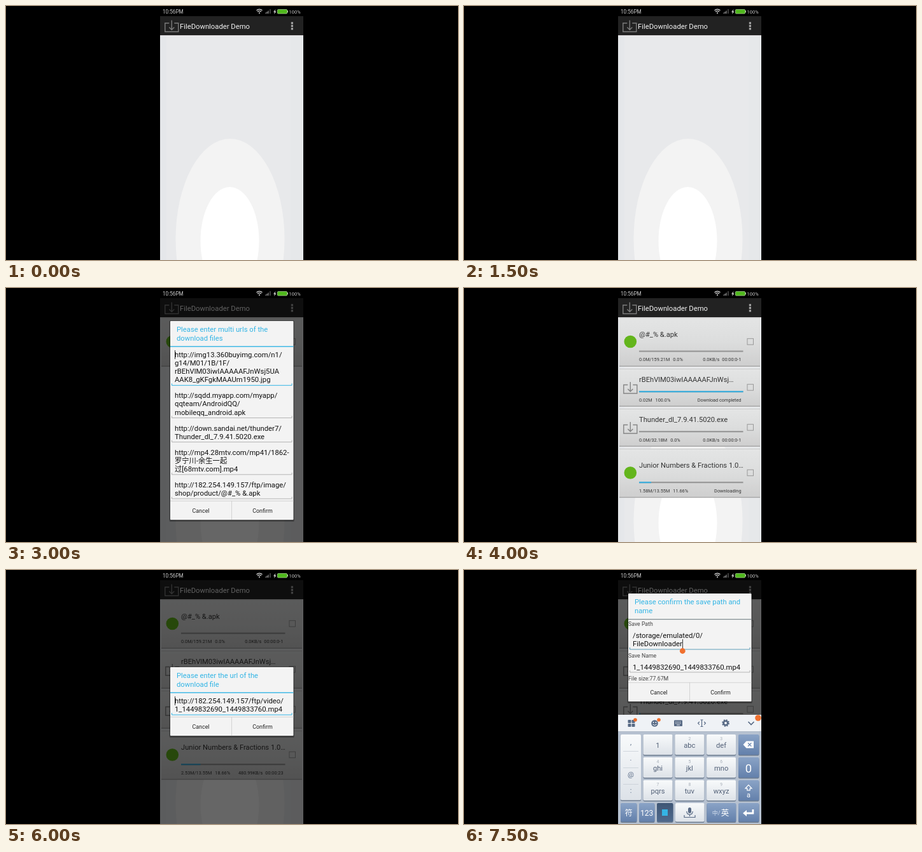
These frames come from a looping animation (710 by 400 pixels, 8000 ms). An HTML page:

```html
<!DOCTYPE html>
<html lang="en">
<head>
<meta charset="utf-8">
<title>FileDownloader Demo</title>
<style>
  html, body { margin: 0; width: 100%; height: 100%; overflow: hidden; background: #000; }
  svg { display: block; }
  text { font-family: Roboto, "Noto Sans CJK SC", "Noto Sans CJK", sans-serif; }
</style>
</head>
<body>
<svg id="stage" width="710" height="400" viewBox="0 0 710 400">
  <defs>
    <linearGradient id="card" x2="0" y2="1"><stop stop-color="#e4e5e5"/><stop offset=".5" stop-color="#dcdddd"/><stop offset="1" stop-color="#cecece"/></linearGradient>
    <linearGradient id="light" x2="0" y2="1"><stop stop-color="#f8fafb"/><stop offset="1" stop-color="#dde2e8"/></linearGradient>
    <linearGradient id="blue" x2="0" y2="1"><stop stop-color="#8aa3c6"/><stop offset="1" stop-color="#6380ab"/></linearGradient>
    <linearGradient id="dark" x2="0" y2="1"><stop stop-color="#3f5675"/><stop offset="1" stop-color="#4f698c"/></linearGradient>
    <clipPath id="screen"><rect x="242" width="225" height="400"/></clipPath>
    <clipPath id="menuClip"><rect x="262" y="46" width="189" height="122"/></clipPath>
  </defs>
  <g id="view" clip-path="url(#screen)"></g>
</svg>
<script>
const STEP = 500, LOOP = 8000;
const CYAN = '#33b5e5', INK = '#333', GREEN = '#63b51c', ORANGE = '#f0702e';

const esc = s => s.replace(/&/g, '&amp;').replace(/</g, '&lt;');
const rect = (x, y, w, h, fill, more = '') =>
  `<rect x="${x}" y="${y}" width="${w}" height="${h}" fill="${fill}" ${more}/>`;
const text = (x, y, size, fill, s, anchor = 'start') =>
  `<text x="${x}" y="${y}" font-size="${size}" fill="${fill}" text-anchor="${anchor}">${esc(s)}</text>`;
const pair = (x, y, a, b, gap, anchor = 'start') =>
  `<text x="${x}" y="${y}" font-size="7.3" fill="${INK}" text-anchor="${anchor}">${esc(a)}` +
  (b ? `<tspan dx="${gap}">${esc(b)}</tspan>` : '') + '</text>';
const circle = (x, y, r, fill) => `<circle cx="${x}" cy="${y}" r="${r}" fill="${fill}"/>`;
const line = (d, color, w = 1, more = '') =>
  `<path d="${d}" fill="none" stroke="${color}" stroke-width="${w}" ${more}/>`;

const trayIcon = (x, y, color) =>
  line(`M${x - 4} ${y - 5}h-6.5v13.5h21v-13.5h-6.5M${x} ${y - 9.5}v15M${x - 4} ${y + 1.5}l4 4l4 -4`, color, 1.4);

const statusBar = rect(242, 0, 225, 16, '#000') +
  text(246, 12, 8.2, '#c8c8c8', '10:56PM') +
  line('M393.5 7q4.5 -3.6 9 0M395 9q3 -2.4 6 0', '#ddd', 1.3) + circle(398, 11, 1.1, '#ddd') +
  line('M408 12v-1.5M410 12v-3M412 12v-4.5', '#999', 1.2) + line('M415 12v-7', '#666', 1.2) +
  '<path d="M423.5 5l-3.5 4.5h2l-1 3.5l3.5 -4.5h-2z" fill="#ddd"/>' +
  rect(426.5, 5.5, 15, 6.5, '#4fb81c', 'rx="1" stroke="#b5d8a0" stroke-width=".7"') +
  rect(442, 7.2, 1, 3, '#b5d8a0') +
  text(444.5, 11.7, 7.5, '#c8c8c8', '100%');

const header = rect(242, 16, 225, 30, '#222') +
  trayIcon(260.3, 32, '#7d7d7d') +
  text(273, 36, 11.25, '#f3f3f3', 'FileDownloader Demo') +
  [25.3, 29.8, 34.3].map(y => rect(447.8, y, 3.2, 3.2, '#a5a5a5')).join('');

const backdrop = rect(242, 46, 225, 354, '#e8e9eb') +
  rect(242, 46, 10, 354, '#e5e7ea') + rect(447, 46, 20, 354, '#e6e8ea') +
  '<ellipse cx="352" cy="367" rx="85.5" ry="158" fill="#f3f3f3"/>' +
  '<ellipse cx="351.5" cy="370" rx="46" ry="85" fill="#fff"/>' +
  rect(242, 46, 225, 1, '#d9d4d8');

function row(item, top) {
  const big = item.apk, h = big ? 80.5 : 63;
  const bar = top + (big ? 53 : 36), mid = top + (big ? 39 : 30.5);
  const done = 163.5 * parseFloat(item.pct) / 100;
  return rect(244, top + 1, 221, h - 3.5, 'url(#card)') +
    rect(244, top + 1, 221, 1, '#c9caca') +
    rect(244, top + h - 3.5, 221, 1.3, '#a2a2a2') +
    (big ? circle(261.3, mid, 9.8, GREEN) : trayIcon(261.3, mid + 1, '#858585')) +
    text(275, top + (big ? 31 : 22), 11.15, INK, item.name) +
    rect(275, bar, 163.5, 2.3, '#9a9a9a') + rect(275, bar, done, 2.3, '#40aedb') +
    pair(275, bar + 16.7, item.size, item.pct, 5) +
    pair(435.5, bar + 16.7, item.rate, item.left, 4, 'end') +
    rect(445, mid - 4.8, 9.5, 9.5, 'none', 'stroke="#999"');
}

function list(items) {
  let y = 45.5, out = '';
  for (const item of items) {
    out += row(item, y);
    y += item.apk ? 80.5 : 63;
  }
  return out;
}

const kids = (size, pct, rate, left) =>
  ({ apk: true, name: 'Junior Numbers & Fractions 1.0…', size: size + 'M/13.55M', pct, rate, left });
const shop = (size, pct, rate, left) =>
  ({ apk: true, name: '@#_% &.apk', size: size + 'M/159.21M', pct, rate, left });
const exe = (size, pct, rate, left) =>
  ({ name: 'Thunder_dl_7.9.41.5020.exe', size: size + 'M/32.18M', pct, rate, left });
const jpg = { name: 'rBEhVlM03iwIAAAAAFJnWsj…', size: '0.02M', pct: '100.0%', rate: 'Download completed' };
const qq = { apk: true, name: 'mobileqq_android.apk', size: '0.0M/27.44M', pct: '0.0%', rate: 'Waiting' };

const idle = ['0.0', '0.0%', '0.0KB/s', '00:00:0-1'];
const exeRun = exe('0.41', '1.27%', '203.35KB/s', '00:02:39');
const shopRun = shop('0.61', '0.38%', '307.64KB/s', '00:08:47');
const kidsMid = kids('2.53', '18.66%', '480.99KB/s', '00:00:23');

const one = [kids(...idle)];
const oneRun = [kids('1.12', '8.27%', '412.36KB/s', '00:00:30')];
const four = [shop(...idle), jpg, exe(...idle), kids('1.58', '11.66%', 'Downloading')];
const fourMid = [shop(...idle), jpg, exe(...idle), kidsMid];
const fourRun = [shop(...idle), jpg, exeRun, kidsMid];
const five = [shopRun, jpg, exeRun, kids('3.34', '24.62%', '406.73KB/s', '00:00:25'), qq];

const menu = rect(259, 46, 206, 126, '#000', 'opacity=".12"') + rect(260.5, 46, 203, 124, '#000', 'opacity=".3"') +
  rect(262, 46, 200.5, 122, '#303030') +
  [76.3, 106.8, 137.3].map(y => rect(262, y, 200.5, .9, '#4c4c4c')).join('') +
  '<g clip-path="url(#menuClip)">' +
  ['New single download', 'New multi downloads', 'New custom download', 'New big file(more than 2G) download']
    .map((s, i) => text(272.5, 65.7 + 30.5 * i, 11.25, '#f0f0f0', s)).join('') + '</g>';

const dim = rect(242, 16, 225, 384, '#000', 'opacity=".6"');

const underline = (y, color) => line(`M260.5 ${y - 3}v3h188.5v-3`, color);

function buttons(y) {
  return rect(258, y, 193.5, .9, '#d0d0d0') + rect(354, y, .9, 30, '#d0d0d0') +
    text(306, y + 19, 8.9, '#222', 'Cancel', 'middle') + text(403, y + 19, 8.9, '#222', 'Confirm', 'middle');
}

const panel = (top, h, title) =>
  rect(256.5, top - 1, 196.5, h + 4, '#000', 'opacity=".3" rx="2"') +
  rect(258, top, 193.5, h, '#f3f3f3', 'rx="1"') +
  title.map((s, i) => text(268, top + 17.4 + 13.1 * i, 11.25, CYAN, s)).join('');

const lines = (y, rows) => rows.map((s, i) => text(265, y + 13.1 * i, 11.3, '#111', s)).join('');

function urlDialog(top, title, fields) {
  let y = top + 57, body = rect(258, top + 39.5, 193.5, 1.4, CYAN) + rect(265, y - 11, .9, 14, '#222');
  fields.forEach((rows, i) => {
    const base = y + 13.1 * (rows.length - 1) + 5;
    body += lines(y, rows) + underline(base, i ? '#b5b5b5' : CYAN);
    y = base + 20;
  });
  const foot = y - 17;
  return panel(top, foot + 30 - top, title) + body + buttons(foot);
}

const singleTitle = ['Please enter the url of the', 'download file'];
const singleDialog = urlDialog(147, singleTitle, [
  ['http://182.254.149.157/ftp/image/', 'shop/product/Junior Numbers &', 'Fractions 1.0.5.apk']]);
const customDialog = urlDialog(153, singleTitle, [
  ['http://182.254.149.157/ftp/video/', '1_1449832690_1449833760.mp4']]);
const multiDialog = urlDialog(52, ['Please enter multi urls of the', 'download files'], [
  ['http://img13.360buyimg.com/n1/', 'g14/M01/1B/1F/', 'rBEhVlM03iwIAAAAAFJnWsj5UA', 'AAK8_gKFgkMAAUm1950.jpg'],
  ['http://sqdd.myapp.com/myapp/', 'qqteam/AndroidQQ/', 'mobileqq_android.apk'],
  ['http://down.sandai.net/thunder7/', 'Thunder_dl_7.9.41.5020.exe'],
  ['http://mp4.28mtv.com/mp41/1862-', '罗宁川-余生一起', '过[68mtv.com].mp4'],
  ['http://182.254.149.157/ftp/image/', 'shop/product/@#_% &.apk']]);

function saveDialog(top, editing) {
  return panel(top, 170, ['Please confirm the save path and', 'name']) +
    rect(258, top + 40.2, 193.5, 1, '#66757c') +
    text(258, top + 51, 8.75, '#444', 'Save Path') +
    lines(top + 70, ['/storage/emulated/0/', 'FileDownloader']) +
    underline(top + 88, '#5f9db8') +
    text(258, top + 100.5, 8.75, '#444', 'Save Name') +
    lines(top + 119.5, ['1_1449832690_1449833760.mp4']) + underline(top + 124, '#b5b5b5') +
    text(258, top + 137, 8.75, '#444', 'File size:77.67M') + buttons(top + 139.8) +
    (editing ? rect(343, top + 72, .9, 14, '#222') + circle(343.3, top + 90.5, 4.4, ORANGE) : '');
}

function keyboard() {
  const SLATE = '#586a85';
  const key = (x, y, w, h, fill) =>
    rect(x, y + 1, w, h, '#6d7c90', 'rx="2"') + rect(x, y, w, h - .5, `url(#${fill})`, 'rx="2"');
  const label = (x, y, size, fill, s) => text(x, y, size, fill, s, 'middle');
  let out = rect(242, 228, 225, 172, '#b6c1d0') + rect(242, 228, 225, 26.5, '#eff2f6') + rect(242, 254, 225, .8, '#a3afbf');

  // toolbar
  for (const [x, y] of [[257.5, 236], [263.5, 236], [257.5, 242], [263.5, 242]])
    out += rect(x, y, 5, 5, SLATE, 'rx=".8"');
  out += circle(299.5, 241.5, 5.3, SLATE) + circle(297.6, 240, .9, '#fff') + circle(301.4, 240, .9, '#fff') +
    line('M296.5 243q3 3 6 0', '#fff') +
    rect(330, 236.5, 13, 9.5, SLATE, 'rx="1"') + line('M332 239.3h9M332 241.6h9', '#eff2f6', 1, 'stroke-dasharray="1.4 1"') +
    line('M334 244h5', '#eff2f6') +
    line('M371.5 236h4M373.5 236v10.5M371.5 246.5h4M369.8 239l-2.2 2.3l2.2 2.3M377.2 239l2.2 2.3l-2.2 2.3', SLATE, 1.2) +
    '<circle cx="411" cy="241" r="3.3" fill="none" stroke="#586a85" stroke-width="2.6"/>' +
    '<circle cx="411" cy="241" r="5" fill="none" stroke="#586a85" stroke-width="1.8" stroke-dasharray="2.1 1.83"/>' +
    line('M446.5 239l4.5 4.5l4.5 -4.5', SLATE, 1.7) +
    circle(269, 236, 2.8, ORANGE) + circle(306, 236, 2.8, ORANGE) + circle(462, 233, 4.8, ORANGE);

  // punctuation column
  out += key(246, 259, 32, 104, 'light');
  [',', '.', '@', ':'].forEach((s, i) => {
    out += label(262, [275, 300, 326, 351][i], 11, SLATE, s);
    if (i) out += rect(250, 259 + 26 * i, 24, .7, '#c3cad3');
  });

  // letter grid
  ['1', 'abc', 'def', 'ghi', 'jkl', 'mno', 'pqrs', 'tuv', 'wxyz'].forEach((s, i) => {
    const x = 281.5 + 49.8 * (i % 3), y = 259 + 36 * Math.floor(i / 3);
    out += key(x, y, 46, 32.5, 'light') + label(x + 23, y + (i ? 20.5 : 21), 11.2, '#536178', s);
    if (i) out += label(x + 23, y + 9, 6.8, '#a9b0ba', String(i + 1));
  });

  // side column
  for (const y of [259, 295, 331]) out += key(431, y, 32.5, 32.5, 'blue');
  out += '<path d="M438.5 275l5 -5.5h11.5v11h-11.5z" fill="#fff"/>' + line('M446 272.3l5.4 5.4M451.4 272.3l-5.4 5.4', '#6d89b3', 1.3) +
    label(447, 318.5, 18.5, '#fff', '0') +
    line('M447 338.5l-5 5.3h2.8v3h4.4v-3h2.8z', '#fff', 1.2) + label(447, 358, 11, '#fff', 'a');

  // bottom row
  out += key(246, 367, 25.5, 30, 'blue') + label(258.7, 387, 12, '#fff', '符') +
    key(275, 367, 24.5, 30, 'blue') + label(287.2, 386.5, 12, '#fff', '123') +
    key(303, 367, 25.5, 30, 'dark') + rect(311, 377, 9, 10, '#35b4e4') +
    key(332, 367, 45.5, 30, 'light') + rect(352, 374, 5, 9, SLATE, 'rx="2.5"') +
    line('M349.8 380q0 5 4.7 5t4.7 -5M354.5 385v3M346 386v3.5h17v-3.5', SLATE, 1.2) +
    key(381.3, 367, 46, 30, 'blue') + label(396, 386, 9, '#d3deee', '中/') + label(410, 386.5, 12.5, '#fff', '英') +
    key(431, 367, 32.5, 30, 'blue') +
    '<path d="M438 383l6 -5v3.6h8.5v-4.6h2.8v7.4h-11.3v3.6z" fill="#fff"/>';
  return out;
}

const page = (items, over = '') => backdrop + list(items) + header + over;
const modal = (items, over) => page(items, dim + over);

// one scene per half second
const scenes = [
  page([]), page([], menu), modal([], singleDialog), page([]),
  page(one), page(one, menu), modal(one, multiDialog), page(oneRun),
  page(four), page(four), page(fourMid), page(fourRun, menu),
  modal(fourRun, customDialog), page(five), modal(five, saveDialog(123, false)),
  modal(five, saveDialog(37, true) + keyboard())
];

const view = document.getElementById('view');
view.innerHTML = statusBar + scenes.map(s => `<g display="none">${s}</g>`).join('');
const groups = [...view.children].slice(-scenes.length);

let shown = -1;
const start = performance.now();
function draw(now) {
  const i = Math.floor(Math.max(0, now - start) % LOOP / STEP);
  if (i !== shown) {
    groups.forEach((g, n) => g.setAttribute('display', n === i ? 'inline' : 'none'));
    shown = i;
  }
  requestAnimationFrame(draw);
}
draw(start);
</script>
</body>
</html>
```
